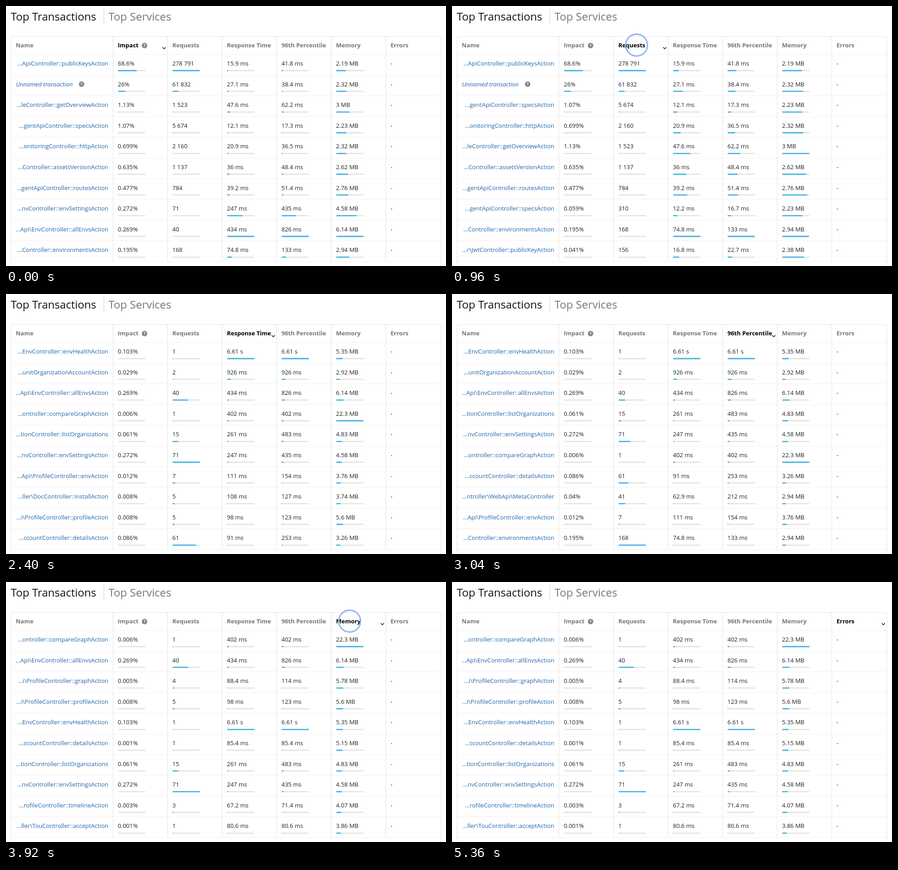
An HTML page that plays this animation: 968 by 572 pixels, repeating every 5.44 s.

```html
<!DOCTYPE html>
<html lang="en">
<head>
<meta charset="utf-8">
<title>Top Transactions</title>
<style>
  html, body { margin: 0; width: 100%; height: 100%; overflow: hidden; background: #fff; }
  svg { display: block; width: 968px; height: 572px; font: 13px "Open Sans", "Noto Sans", sans-serif; fill: #222; }
  .title { font-size: 24px; font-weight: 500; fill: #111; }
  .muted { fill: #777; }
  .head { font-weight: 700; fill: #777; }
  .active .head { fill: #000; }
  .name { fill: #1f66ab; text-anchor: end; }
  .unnamed { fill: #1f66ab; font-style: italic; }
  .dots { fill: #3c4a58; }
  .help { fill: #858585; }
  .mark { font-size: 9px; font-weight: 700; fill: #fff; text-anchor: middle; }
  .track { fill: #e3e3e3; }
  .bar { fill: #3bb3e6; }
  .line { fill: none; stroke: #e4e4e4; }
  .row { stroke: #f1f1f1; }
  .chevron { fill: none; stroke: #111; stroke-width: 1.5; }
  .ring { fill: none; stroke: #8fb5ee; stroke-width: 3; }
</style>
</head>
<body>
<svg id="stage" viewBox="0 0 968 572"></svg>
<script>
const LOOP = 5440, PITCH = 45.6, BAR = 60;
const columns = ['Impact', 'Requests', 'Response Time', '96th Percentile', 'Memory', 'Errors'];
const colX = i => 246 + 120 * i;

// name | impact % | requests | response ms | percentile ms | memory MB
const data = `
ApiController::publicKeysAction|68.6|278791|15.9|41.8|2.19
|26|61832|27.1|38.4|2.32
leController::getOverviewAction|1.13|1523|47.6|62.2|3
gentApiController::specsAction|1.07|5674|12.1|17.3|2.23
onitoringController::httpAction|0.699|2160|20.9|36.5|2.32
Controller::assetsVersionAction|0.635|1137|36|48.4|2.62
gentApiController::routesAction|0.477|784|39.2|51.4|2.76
nvController::envSettingsAction|0.272|71|247|435|4.58
Api\\EnvController::allEnvsAction|0.269|40|434|826|6.14
Controller::environmentsAction|0.195|168|74.8|133|2.94
gentApiController::specsAction|0.059|310|12.2|16.7|2.23
r\\JwtController::publicKeyAction|0.041|156|16.8|22.7|2.38
EnvController::envHealthAction|0.103|1|6610|6610|5.35
unitOrganizationAccountAction|0.029|2|926|926|2.92
ontroller::compareGraphAction|0.006|1|402|402|22.3
tionController::listOrganizations|0.061|15|261|483|4.83
Api\\ProfileController::envAction|0.012|7|111|154|3.76
ller\\DocController::installAction|0.008|5|108|127|3.74
i\\ProfileController::profileAction|0.008|5|98|123|5.6
ccountController::detailsAction|0.086|61|91|253|3.26
ntroller\\WebApi\\MetaController|0.04|41|62.9|212|2.94
i\\ProfileController::graphAction|0.005|4|88.4|114|5.78
ccountController::detailsAction|0.001|1|85.4|85.4|5.15
rofileController::timelineAction|0.003|3|67.2|71.4|4.07
ller\\TouController::acceptAction|0.001|1|80.6|80.6|3.86`
  .trim().split('\n').map(line => {
    const [name, ...values] = line.split('|');
    return { name, values: values.map(Number) };
  });

const time = v => v < 1000 ? v + ' ms' : v / 1000 + ' s';
const formats = [
  v => v + '%',
  v => String(v).replace(/\B(?=(\d{3})+$)/g, ' '),
  time,
  time,
  v => v + ' MB'
];

const text = (x, y, s, cls = '') => `<text x="${x}" y="${y}" class="${cls}">${s}</text>`;
const rect = (x, y, w, cls) => `<rect x="${x}" y="${y}" width="${w}" height="2.6" rx="1" class="${cls}"/>`;
const help = (x, y) => `<circle cx="${x}" cy="${y}" r="6" class="help"/>` + text(x, y + 3.3, '?', 'mark');
const header = i => text(colX(i), 91, columns[i], 'head');

function topRows(key) {
  // The errors column is all equal, so it keeps the memory order.
  const k = Math.min(key, 4);
  return [...data].sort((a, b) => b.values[k] - a.values[k]).slice(0, 10);
}

function drawRow(row, n, max) {
  const y = n * PITCH, base = (131 + y).toFixed(1);
  let out = row.name
    ? text(225, base, `<tspan class="dots">…</tspan>${row.name}`, 'name')
    : text(22, base, 'Unnamed transaction', 'unnamed') + help(166.3, 126.3 + y);
  row.values.forEach((v, i) => {
    const x = colX(i);
    out += text(x, base, formats[i](v))
      + rect(x + .5, 140.8 + y, BAR, 'track')
      + rect(x + .5, 140.8 + y, BAR * v / max[i], 'bar');
  });
  return out + text(colX(5), base, '-');
}

function drawView(key) {
  const rows = topRows(key);
  const max = formats.map((_, i) => i ? Math.max(...rows.map(r => r.values[i])) : 100);
  const chevX = key < 5 ? 348 + 120 * key : 949;
  return `<g class="view">`
    + columns.map((_, i) => i === key ? `<g class="active">${header(i)}</g>` : header(i)).join('')
    + `<path class="chevron" d="M${chevX - 3.5} 90.7l3.5 3.5 3.5-3.5"/>`
    + rows.map((r, n) => drawRow(r, n, max)).join('') + '</g>';
}

function drawFrame() {
  let lines = '';
  for (let n = 0; n <= 10; n++) lines += `M11 ${Math.round(106 + n * PITCH) + .5}H957`;
  const cols = columns.map((_, i) => `M${235.5 + 120 * i} 67V562`).join('');
  return text(10.5, 32, 'Top Transactions', 'title')
    + text(225.5, 32, 'Top Services', 'title muted')
    + '<path class="line" style="stroke:#ccc" d="M215.5 7V39"/>'
    + `<path class="line row" d="${lines}"/>`
    + `<path class="line" d="${cols}M11 572V69.5q0-2.5 2.5-2.5H954.5q2.5 0 2.5 2.5V572"/>`
    + text(21.5, 91, 'Name', 'head') + help(304.8, 87);
}

const clicks = [880, 1920, 2880, 3840, 4720];
const ringX = [406, 530, 650, 756, 860];

const stage = document.getElementById('stage');
stage.innerHTML = drawFrame()
  + columns.map((_, i) => drawView(i)).join('')
  + ringX.map(x => `<circle class="ring" cx="${x}" cy="86" r="24"/>`).join('');

function show(el, from, to) {
  const at = (t, opacity) => ({ offset: t / LOOP, opacity, easing: 'step-end' });
  el.animate([at(0, from ? 0 : 1), at(from, 1), at(to, to < LOOP ? 0 : 1), at(LOOP, to < LOOP ? 0 : 1)],
    { duration: LOOP, iterations: Infinity });
}

const bounds = [0, ...clicks, LOOP];
stage.querySelectorAll('.view').forEach((v, i) => show(v, bounds[i], bounds[i + 1]));
stage.querySelectorAll('.ring').forEach((r, i) => show(r, clicks[i] - 80, clicks[i] + 160));
</script>
</body>
</html>
```
